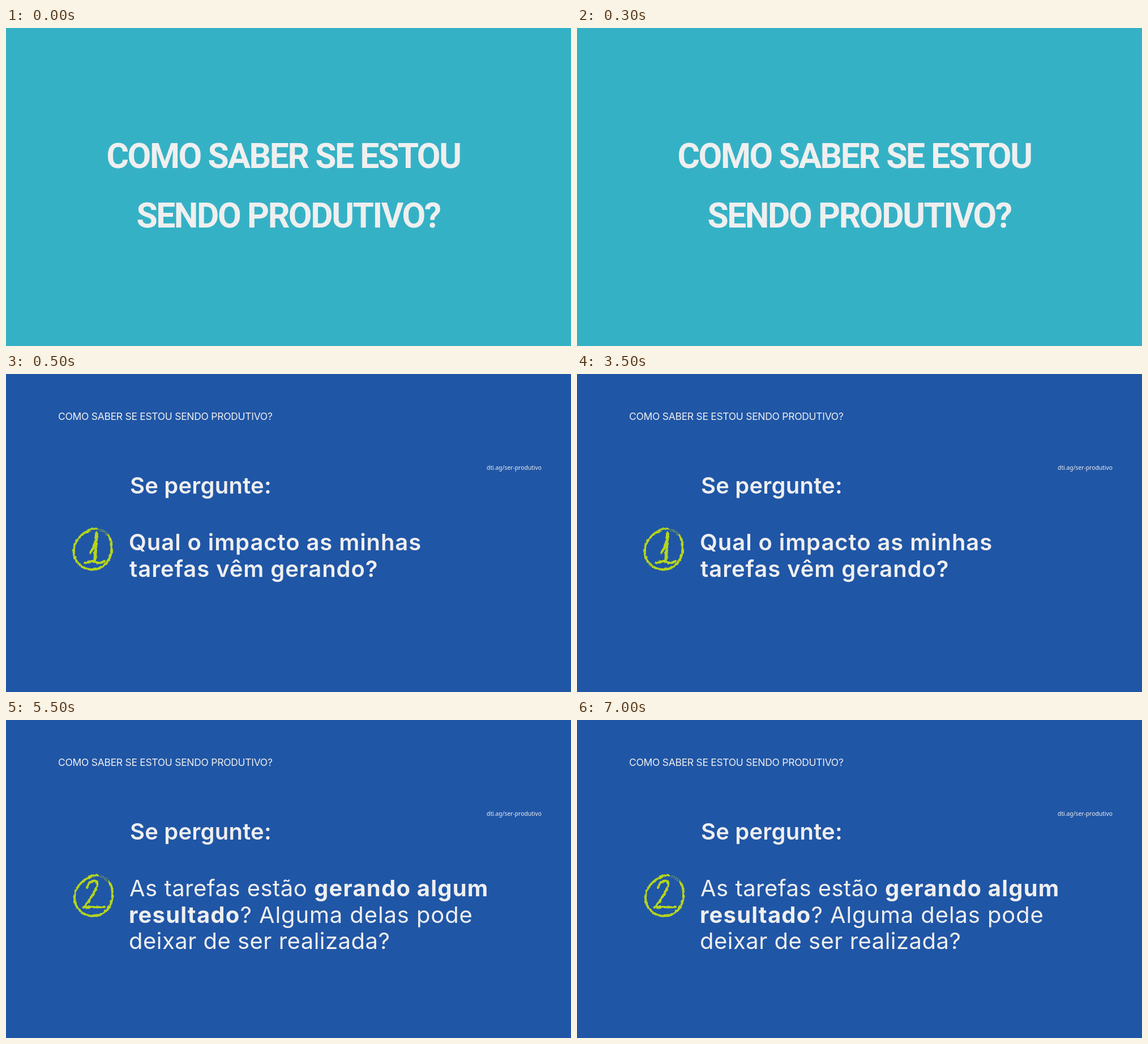
Write an HTML page that moves like this. It is 998 px wide and 561 px high and loops after 8000 ms.

```html
<!DOCTYPE html>
<html lang="pt-BR">
<head>
<meta charset="utf-8">
<title>Como saber se estou sendo produtivo?</title>
<style>
  html, body { margin: 0; width: 100%; height: 100%; overflow: hidden; background: #2056a6; }
  svg { display: block; width: 100%; height: 100%; }
  text { fill: #efefef; font-family: Inter, sans-serif; font-optical-sizing: none; white-space: pre; }

  .heading { font-size: 17.5px; letter-spacing: -.017em; }
  .address { font: 10.3px "Noto Sans", "Open Sans", sans-serif; text-anchor: middle; }
  .body { font-size: 40px; letter-spacing: .012em; }
  .semi { font-weight: 600; letter-spacing: .023em; }
  .tight { letter-spacing: .005em; }
  .loose { letter-spacing: .022em; }
  .bold { font-weight: 700; letter-spacing: .03em; }
  .title text {
    font-family: Roboto, sans-serif;
    font-size: 60.5px; font-weight: 700;
    letter-spacing: -.04em; text-anchor: middle;
  }

  .badge { fill: none; stroke: #b5d51f; stroke-width: 4; stroke-linecap: round; stroke-linejoin: round; }
  .stem { stroke-width: 5.5; }
  .speckle { stroke-width: 1.5; stroke-dasharray: 1 2.6 2 2; opacity: .6; }

  .scene { animation: 8s step-end infinite; }
  .title { animation-name: title; }
  .first { animation-name: first; }
  .second { animation-name: second; }
  @keyframes title { 0% { visibility: visible } 6.25%, 100% { visibility: hidden } }
  @keyframes first { 0% { visibility: hidden } 6.25% { visibility: visible } 68.75%, 100% { visibility: hidden } }
  @keyframes second { 0% { visibility: hidden } 68.75%, 100% { visibility: visible } }
</style>
</head>
<body>
<svg viewBox="0 0 998 561">
  <defs>
    <filter id="chalk" filterUnits="userSpaceOnUse" x="105" y="260" width="100" height="100">
      <feTurbulence type="fractalNoise" baseFrequency=".22" numOctaves="2" seed="4"/>
      <feDisplacementMap in="SourceGraphic" scale="4" xChannelSelector="R" yChannelSelector="G"/>
    </filter>
    <g id="ring">
      <path d="M160 273C145 271 119 291 119.500 313C120 332 135 345 153 345C172 345 186 329 186.500 308C187 297 185 291 181 285"/>
      <path class="speckle" d="M163 273Q174 275 182 284M165 276Q174 279 180 286"/>
    </g>
  </defs>

  <text class="heading" x="92" y="80.500">COMO SABER SE ESTOU SENDO PRODUTIVO?</text>
  <text class="address" x="897.500" y="169">dti.ag/ser-produtivo</text>
  <text class="body semi tight" x="219" y="211">Se pergunte:</text>

  <g class="scene first">
    <g class="badge" filter="url(#chalk)">
      <use href="#ring"/>
      <path d="M160 280Q158 302 149 316M139 334Q149 329 158 332T174 330"/>
      <path class="stem" d="M160 281L157 330"/>
    </g>
    <text class="body semi" x="217" y="311">Qual o impacto as minhas</text>
    <text class="body semi" x="218" y="357.500">tarefas vêm gerando?</text>
  </g>

  <g class="scene second">
    <g class="badge" filter="url(#chalk)">
      <use href="#ring" x="1.500" y="1"/>
      <path d="M143 296C145 287 154 281 160 285C166 291 150 315 137 331C150 328 160 332 174 329.500"/>
    </g>
    <text class="body" x="218" y="311">As tarefas estão <tspan class="bold">gerando algum</tspan></text>
    <text class="body" x="217" y="357.500"><tspan class="bold">resultado</tspan><tspan class="loose">? Alguma delas pode</tspan></text>
    <text class="body" x="217" y="404">deixar de ser realizada?</text>
  </g>

  <g class="scene title">
    <rect x="-1000" y="-1000" width="3000" height="3000" fill="#35b1c6"/>
    <text x="490" y="225.500" dy=".357em">COMO SABER SE ESTOU</text>
    <text x="498.500" y="330.500" dy=".357em">SENDO PRODUTIVO?</text>
  </g>
</svg>
</body>
</html>
```
